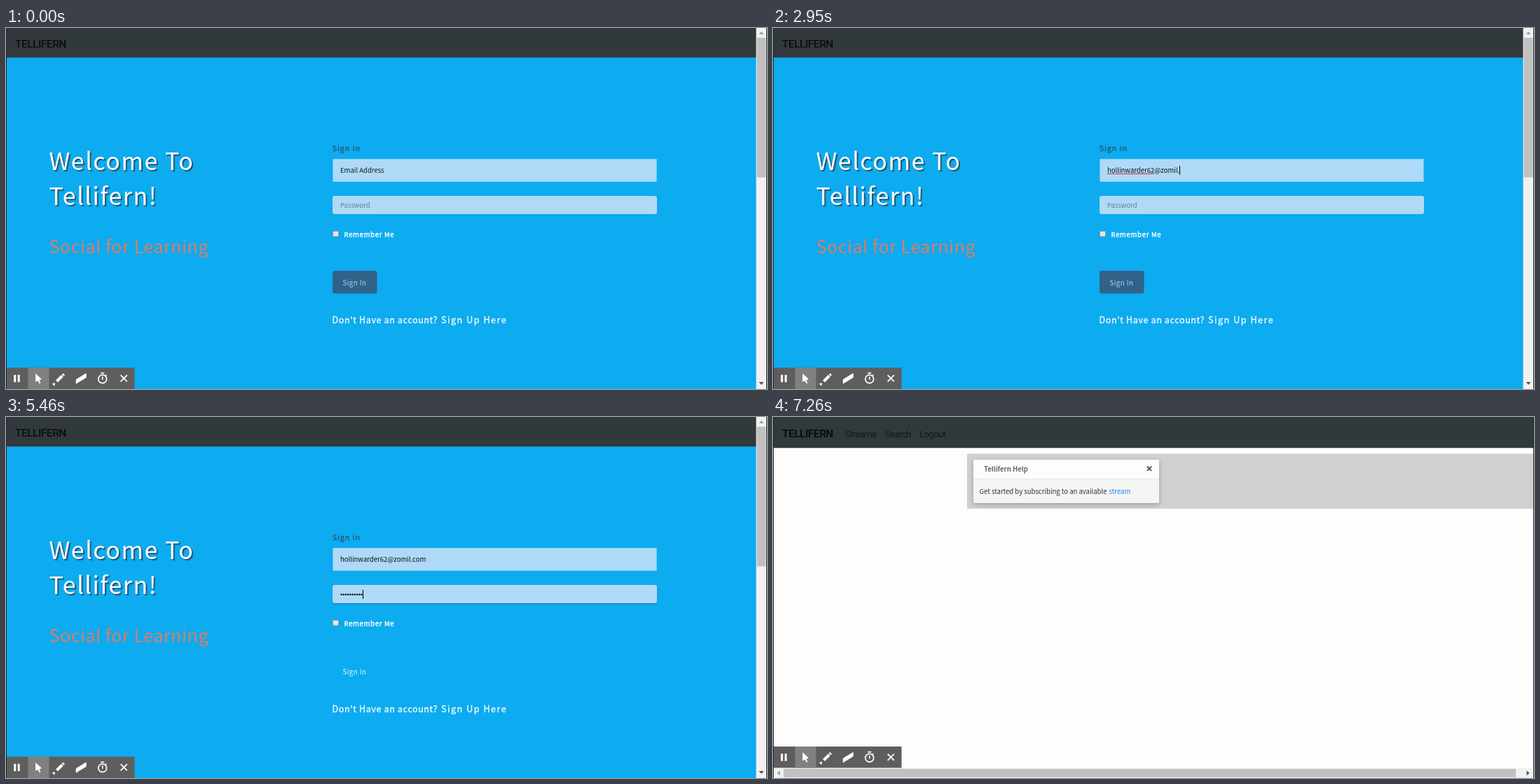
An HTML page with a canvas for the animation above (8 s loop, 1086 px wide and 516 px high).

```html
<!DOCTYPE html>
<html lang="en">
<head>
<meta charset="utf-8">
<title>Sign in</title>
<style>
html, body { margin: 0; width: 100%; height: 100%; overflow: hidden; background: #0dabf0; }
canvas { display: block; }
</style>
</head>
<body>
<canvas id="stage" width="1086" height="516"></canvas>
<script>
const ctx = document.getElementById('stage').getContext('2d');
const LOOP = 8000;
const SANS = '"Noto Sans CJK JP", "Noto Sans CJK SC", "Noto Sans", sans-serif';
const CJK_SCALE = 1.117; // Latin glyphs in the CJK family run large
const BODY = 10.65;
const BRAND = 'Tellifern';
const EMAIL = 'hollinwarder62@zomil.com';
const NAME_LENGTH = EMAIL.indexOf('@');

// Typing comes in bursts of evenly spaced steps, each ending at a given length.
const burst = (start, gap, steps, length) => ({ start, gap, steps, length });
const EMAIL_TYPING = [
  burst(100, 188, 6, 8), burst(1200, 166, 4, NAME_LENGTH),
  burst(2180, 154, 7, 22), burst(3260, 1, 1, EMAIL.length)
];
const PASSWORD_TYPING = [burst(3880, 150, 6, 8), burst(5460, 1, 1, 10)];

function typed(bursts, t) {
  let count = 0;
  for (const { start, gap, steps, length } of bursts) {
    if (t < start) break;
    const step = Math.min(steps, 1 + Math.floor((t - start) / gap));
    count = Math.round(count + (length - count) * step / steps);
  }
  return count;
}

const within = (t, from, to) => t >= from && t < to;

function rect(x, y, w, h, color, radius = 0) {
  ctx.fillStyle = color;
  ctx.beginPath();
  ctx.roundRect(x, y, w, h, radius);
  ctx.fill();
}

function disc(x, y, radius, color) {
  ctx.fillStyle = color;
  ctx.beginPath();
  ctx.arc(x, y, radius, 0, Math.PI * 2);
  ctx.fill();
}

// Draws around a moved and turned origin.
function at(x, y, degrees, draw) {
  ctx.save();
  ctx.translate(x, y);
  ctx.rotate(degrees * Math.PI / 180);
  draw();
  ctx.restore();
}

function triangle(x, y, degrees, halfBase, height, color) {
  at(x, y, degrees, () => {
    ctx.fillStyle = color;
    ctx.beginPath();
    ctx.moveTo(0, 0);
    ctx.lineTo(-halfBase, height);
    ctx.lineTo(halfBase, height);
    ctx.fill();
  });
}

function cross(x, y, size, width, color) {
  for (const degrees of [45, -45]) {
    at(x, y, degrees, () => rect(-size / 2, -width / 2, size, width, color));
  }
}

function withShadow(color, blur, dx, dy, draw) {
  ctx.save();
  Object.assign(ctx, { shadowColor: color, shadowBlur: blur, shadowOffsetX: dx, shadowOffsetY: dy });
  draw();
  ctx.restore();
}

function text(str, x, y, size, color, { spacing = 0, weight = 400, heft = 0 } = {}) {
  ctx.font = `${weight} ${size / CJK_SCALE}px ${SANS}`;
  ctx.letterSpacing = spacing + 'px';
  ctx.fillStyle = ctx.strokeStyle = color;
  ctx.lineWidth = heft;
  ctx.fillText(str, x, y);
  if (heft) ctx.strokeText(str, x, y);
}

function navText(str, x, y, size, spacing, color, weight = 400) {
  ctx.font = `${weight} ${size}px Roboto, sans-serif`;
  ctx.letterSpacing = spacing + 'px';
  ctx.fillStyle = color;
  ctx.fillText(str, x, y);
}

function navBar(width, height, color, brandY, brandColor) {
  rect(0, 0, width, height, color);
  navText(BRAND.toUpperCase(), 13, brandY, 15.5, -0.5, brandColor, 500);
}

function sideEdges() {
  for (const x of [0, 1085]) rect(x, 0, 1, 516, '#1c262c');
}

const WHITE = '#fff';
const ICONS = [
  function pause() {
    for (const x of [-4.5, 1]) rect(x, -5, 3, 10.5, WHITE);
  },
  function pointer() {
    triangle(-4, -7, -23, 4.8, 11, WHITE);
    at(0, 2, -25, () => rect(-1, -1, 2, 6.5, WHITE));
  },
  function pencil() {
    at(0, 0, -45, () => {
      rect(-6, -2, 11, 4, WHITE);
      rect(6, -2, 2.5, 4, WHITE, 1);
    });
    triangle(-6.5, 6.5, 45, 2.5, 4, WHITE);
  },
  function eraser() {
    ctx.transform(1, -0.6, 0, 1, 0, 0);
    rect(-7.5, -3, 15, 6.5, WHITE, 1);
  },
  function stopwatch() {
    disc(0, 1, 6.8, WHITE);
    disc(0, 1, 5.1, '#5e5e5e');
    rect(-2.5, -8.3, 5, 1.7, WHITE);
    rect(-0.8, -2.5, 1.6, 4.5, WHITE);
    at(5, -4.5, 45, () => rect(-0.8, -1, 1.6, 2, WHITE));
  },
  function close() {
    cross(0, 0, 13, 1.8, WHITE);
  }
];

function toolbar(top) {
  const cell = 30.5;
  rect(1, top, ICONS.length * cell - 0.5, cell, '#5e5e5e');
  rect(1 + cell, top, cell - 0.5, cell, '#808080');
  ICONS.forEach((icon, i) => at(15.7 + i * cell, top + cell / 2, 0, icon));
}

function emailField(t) {
  const x = 477, y = 207;
  rect(466.4, 187.3, 462.2, 32.4, '#aedaf8');
  const count = typed(EMAIL_TYPING, t);
  if (!count) {
    text('Email Address', x, y, BODY, '#15191c');
    return;
  }
  const value = EMAIL.slice(0, count);
  text(value, x, y, BODY, '#0d1013');
  const widthOf = str => ctx.measureText(str).width;
  const focused = t < 3420;
  if (focused && count > NAME_LENGTH) rect(x, 208, widthOf(EMAIL.slice(0, NAME_LENGTH)), 1, '#e0263c');
  if (focused) rect(Math.round(x + widthOf(value)), 197, 1, 13, '#000');
}

function passwordField(t) {
  const x = 477, pitch = 3.2;
  const count = typed(PASSWORD_TYPING, t);
  const box = () => rect(466, 240, 463, 26, '#b4d7f0', 3);
  if (count) withShadow('rgba(30,80,120,.3)', 2, 0, 1.5, box);
  else box();
  rect(467, 241, 461, 24, '#aedaf8', 2);

  if (!count) text('Password', x, 257, BODY, '#6c7f8c');
  for (let i = 0; i < count; i++) disc(x + pitch * (i + 0.5), 253.7, 1.25, '#0d1013');
  const blinkedOff = within(t, 5100, 5460) || within(t, 6100, 6500);
  if (t >= 3420 && !blinkedOff) rect(x + pitch * count, 247, 1, 13, '#000');
}

function signInPage(t) {
  rect(0, 0, 1086, 516, '#0dabf0');
  navBar(1071, 42.3, '#32393c', 28, '#0c0e0f');

  withShadow('rgba(45,65,80,.8)', 1, 2, 2, () => {
    const heading = { spacing: 1.5 };
    text('Welcome To', 61.5, 203, 38, WHITE, heading);
    text(BRAND + '!', 61.5, 253.3, 38, WHITE, heading);
  });
  text('Social for Learning', 61.5, 322, 28, '#e27a62', { spacing: 0.55 });

  text('Sign in', 465.7, 176, 12, '#2d3a42', { spacing: 0.9 });
  emailField(t);
  passwordField(t);

  rect(466, 290, 9, 8.5, '#8d9aa2', 1);
  rect(467, 291, 7, 6.5, '#e6e6e6');
  text('Remember Me', 482.5, 299, BODY, WHITE, { spacing: 0.7, heft: 0.35 });

  const ready = typed(PASSWORD_TYPING, t) > 0;
  if (!ready) rect(466, 347, 63.5, 32.5, '#31628a', 3);
  text('Sign In', 480.5, 367.5, 10.8, ready ? '#e8f6fd' : '#b3d3e6', { spacing: 0.45 });

  text("Don't Have an account?", 465.5, 422, 14, '#f6fbff', { spacing: 0.62, heft: 0.3 });
  text('Sign Up Here', 621, 422, 14, '#f6fbff', { spacing: 1.55, heft: 0.3 });

  rect(1070.5, 0, 15, 516, '#f1f1f1');
  rect(1071.5, 14, 13, 199.5, '#c1c1c1');
  triangle(1078, 5, 0, 3.5, 4, '#a0a0a0');
  triangle(1078, 510, 180, 3.5, 4, '#505050');
  sideEdges();
  toolbar(485.5);
}

function helpCard(dy) {
  at(0, dy, 0, () => {
    rect(277, 50.5, 809, 78.5, '#d0d0cf');
    withShadow('rgba(0,0,0,.25)', 6, 0, 2, () => rect(286, 59, 265, 62, '#f5f5f4', 2));
    rect(286, 59, 265, 27, '#fdfdfd', [2, 2, 0, 0]);
    rect(286, 86, 265, 1, '#e7e7e7');
    text(BRAND + ' Help', 301, 76, BODY, '#5f676c', { weight: 700 });
    cross(537, 71.7, 9, 2, '#55595c');
    text('Get started by subscribing to an available ', 294.5, 107.5, BODY, '#2b3034');
    text('stream', 479.5, 107.5, BODY, '#1f82ea');
  });
}

function homePage(t) {
  const menuLoaded = t >= 7260;
  const dy = menuLoaded ? 2 : 0;
  rect(0, 0, 1086, 516, '#fdfdfc');
  navBar(1086, 42.3 + dy, '#303a3b', 28 + dy / 2, menuLoaded ? '#050707' : '#0c1011');
  if (menuLoaded) {
    const menu = { Streams: 103, Search: 160, Logout: 209 };
    for (const label in menu) navText(label, menu[label], 28.5, 13.7, -0.95, '#141a1b');
  }
  helpCard(dy);

  rect(0, 502, 1086, 14, '#f1f1f1');
  rect(15, 503, 1045, 12, '#c1c1c1');
  triangle(6, 509, -90, 3.5, 4, '#a0a0a0');
  triangle(1079.5, 509, 90, 3.5, 4, '#505050');
  sideEdges();
  toolbar(471);
}

const start = performance.now();
function render(now) {
  const t = Math.max(0, now - start) % LOOP;
  if (t < 7030) signInPage(t);
  else homePage(t);
  requestAnimationFrame(render);
}
render(start);
</script>
</body>
</html>
```
